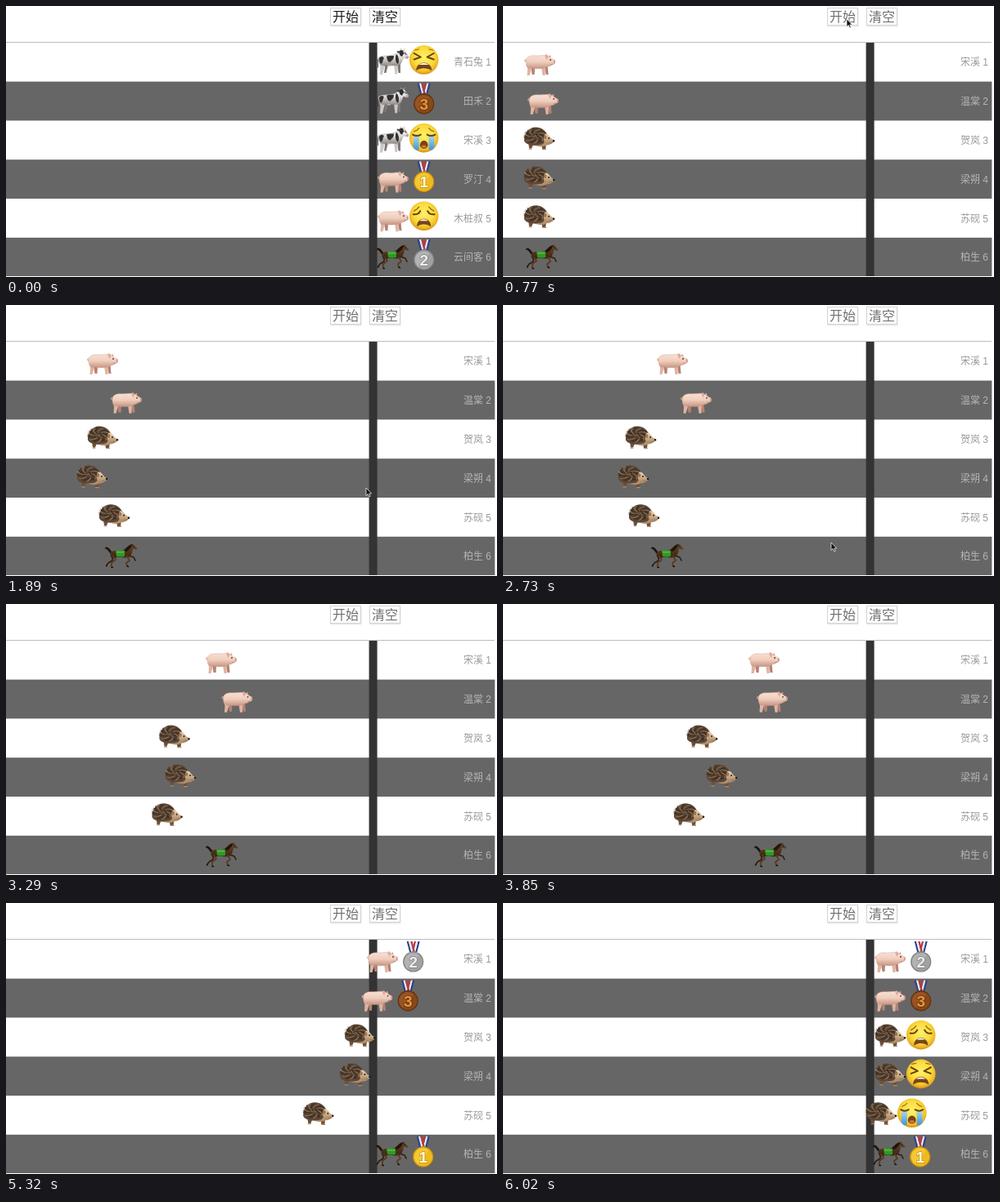
Recreate the animation shown at these times as an HTML page. Size 600 px wide and 332 px high, loop 6.09 s.

```html
<!DOCTYPE html>
<html lang="zh">
<head>
<meta charset="utf-8">
<title>动物赛跑</title>
<style>
html, body { margin: 0; width: 100%; height: 100%; overflow: hidden; background: #fff; }
svg { display: block; width: 600px; height: 332px; }
text { font-family: "Liberation Sans", "Noto Sans CJK SC", "Noto Sans CJK", sans-serif; }
.label { font-size: 12px; font-weight: 500; text-anchor: end; }
.button { font-size: 16px; font-weight: 500; text-anchor: middle; }
.digit { font-size: 19px; font-weight: 700; text-anchor: middle; paint-order: stroke; }
</style>
</head>
<body>
<svg id="stage" viewBox="0 0 600 332">
  <defs>
    <linearGradient id="pink" x2="0" y2="1"><stop stop-color="#f8e0d4"/><stop offset=".5" stop-color="#f0cdbc"/><stop offset="1" stop-color="#c59383"/></linearGradient>
    <linearGradient id="hide" x2="0" y2="1"><stop stop-color="#f7f6f5"/><stop offset=".5" stop-color="#dddbd9"/><stop offset="1" stop-color="#8e8a87"/></linearGradient>
    <linearGradient id="bay" x2="0" y2="1"><stop stop-color="#6d4a2d"/><stop offset="1" stop-color="#38220f"/></linearGradient>
    <linearGradient id="fur" x2="0" y2="1"><stop stop-color="#ecd6b6"/><stop offset="1" stop-color="#a98562"/></linearGradient>
    <radialGradient id="skin" cy=".42" r=".58"><stop stop-color="#fff06a"/><stop offset=".6" stop-color="#fbdb3c"/><stop offset=".85" stop-color="#efb925"/><stop offset="1" stop-color="#cf8f18"/></radialGradient>
    <linearGradient id="tear" x2="0" y2="1"><stop stop-color="#9fd6f2"/><stop offset="1" stop-color="#4295d2"/></linearGradient>
  </defs>
</svg>
<script>
const LOOP = 6090, STEP = 70, SWAP = 420, PITCH = 47.8, TOP = 45, SHOW_AT = 446;
const stage = document.getElementById('stage');

const path = (d, fill, extra = '') => `<path d="${d}" fill="${fill}" ${extra}/>`;
const line = (d, color, width) =>
  path(d, 'none', `stroke="${color}" stroke-width="${width}" stroke-linecap="round" stroke-linejoin="round"`);
const oval = (x, y, rx, ry, fill, extra = '') =>
  `<ellipse cx="${x}" cy="${y}" rx="${rx}" ry="${ry}" fill="${fill}" ${extra}/>`;
const rect = (x, y, w, h, fill, extra = '') =>
  `<rect x="${x}" y="${y}" width="${w}" height="${h}" fill="${fill}" ${extra}/>`;

function spines() {
  let dark = '', light = '';
  for (let i = 0; i < 120; i++) {
    const a = i * 2.4, r = Math.sqrt(i / 120);
    const x = -4 + 13 * r * Math.cos(a), y = -3.5 + 8.5 * r * Math.sin(a);
    const stroke = `M${x.toFixed(1)} ${y.toFixed(1)}l-1.9 ${(y > 0 ? .9 : -.9)}`;
    if (i % 3) dark += stroke; else light += stroke;
  }
  return path('M-18 3C-19 -6 -13 -14 -4 -14C3 -14 8 -10 10 -5C8 0 8 5 4 7C-3 9 -15 9 -18 3Z', '#5d4735') +
    line(dark, '#37291d', .8) + line(light, '#a58a6b', .6);
}

const animals = {
  pig: { y: 27, art:
    line('M-16 -4C-19 -3 -19 -7 -17 -6', '#dca994', 1.1) +
    path('M-11 2L-9.500 12H-6.500L-6 3ZM6 3L7.500 12H10.500L9.500 1Z', '#b58272') +
    path('M-16.500 0L-15 5L-15.500 13H-12.500L-9.500 3ZM2 3L3.500 13H6.500L7 2Z', '#e0b3a1') +
    path('M-17 -4C-17 -11 -10 -11.500 -4 -11C2 -11 5 -12 9 -11C13 -10 14 -7 18 -6C19 -4 18.500 -1.500 17.500 -1C14 0 13 2 10 2C6 5 -5 5.500 -10 4C-14 5 -17 3 -17 -4Z', 'url(#pink)', 'stroke="#c49887" stroke-width=".4"') +
    path('M6.500 -10C6 -14 9 -13 10.500 -10L8.500 -6Z', '#dfab9b') +
    path('M11 -10C12 -13.500 14 -11.500 13 -8.500Z', '#dba697') +
    oval(13, -6, .8, .9, '#30201c') + oval(17.7, -3.5, .9, 2.3, '#d39788') +
    line('M13 0L16 -.8', '#a87264', .6) },
  hedgehog: { y: 22, art:
    path('M-13 5L-12 12H-9L-7 7ZM3 6L4 13H8L9 5Z', '#6e513a') +
    path('M-11 6C-3 10 5 11 9 8C13 8 16 6 18 4C19 2 18 1 17 1C14 0 13 -5 9 -6L-4 4Z', 'url(#fur)') +
    spines() +
    path('M8 -6C12 -5 13 -2 14.500 -.5C16 1 18 1 18.500 3C17 6 12 7 9 7C5 6 5 -4 8 -6Z', 'url(#fur)') +
    oval(7.5, -2, 1.8, 2.5, '#a07552') + oval(12, -.5, .9, 1, '#16100c') +
    oval(18, 2.6, 1.2, 1.2, '#1b1513') + line('M12.500 5Q15 5.500 16.500 4.500', '#79563b', .5) +
    line('M-9 12.500H-12M4.500 13.200H8.500', '#b28c6a', 1.1) },
  horse: { y: 23, art:
    line('M-11 0L-11 6L-16 9L-18 12M9 0L15 2L17 6', '#2f1d0f', 1.6) +
    path('M-12 -5C-16 -11 -20 -12 -20 -8C-19 -10 -16 -6 -13 -2Z', '#1e140d') +
    path('M-13 -3C-12 -7 -6 -6 0 -6C6 -7 9 -11 12 -13L15 -15L15.500 -13L19.500 -8.500C19 -7 17.500 -7 14.500 -9C13 -5 13 0 9 2C4 3 -2 2 -6 2C-9 5 -15 3 -13 -3Z', 'url(#bay)') +
    path('M2 -6C6 -9 9 -14 14 -14L11 -9L7 -5Z', '#21150d') +
    line('M-10 1L-7 5L-12 9L-12 14M7 1L10 6L6 9L7 13', '#5a3a20', 1.8) +
    line('M-12 14.500H-10.500M7 13L8.500 13.500M-18 12L-18.500 13', '#15100b', 1.4) +
    path('M-7 -6.500Q-1 -5 4 -6.500L4 1Q-1 2 -6 1Z', '#2c9a25') +
    path('M-6 -5.500L3 -5.500L3 -3L-6 -3Z', '#5fc644', 'opacity=".6"') +
    line('M14.500 -12L15.500 -9', '#20251b', .6) + oval(15, -11.5, .5, .5, '#0d0a08') },
  cow: { y: 23, art:
    line('M-17 -5C-20 -2 -18 3 -18.500 7', '#45413f', 1) +
    path('M-11 2L-10 7L-11 14H-8.500L-6 4ZM5 3L6.500 14H9L9 1Z', '#7d7976') +
    path('M-17 1L-15.500 7L-16 16H-13L-10 4ZM1 4L2.500 15.500H5L6 3Z', '#cbc7c4') +
    path('M-18 -4C-16 -8 -8 -6 0 -8C5 -9 7 -14 12 -14C16 -13 16 -9 19 -6C19 -3 16 -3 13 -5C11 -3 11 2 8 4C2 6 -6 4 -11 5C-17 5 -18 0 -18 -4Z', 'url(#hide)', 'stroke="#8a8582" stroke-width=".4"') +
    path('M-17 -4C-14 -7 -12 -6 -11 -4C-13 -2 -12 2 -15 3C-17 1 -17 -2 -17 -4ZM-8 -6C-5 -7.500 -1 -7 1 -7C1 -4 0 -2 -2 -1C-3 2 -6 1 -7 -2ZM4 -9C7 -7 8 0 6 3C3 2 2 -5 4 -9Z', '#343130') +
    path('M8 -13C10 -15 13 -14 13 -10L11 -6C8 -7 7 -10 8 -13ZM14 -12L17 -8L15 -8.500Z', '#302d2c') +
    path('M8.500 -12.500L4.500 -13Q5 -9.500 9 -10Z', '#4a4643') + line('M10 -14L9.500 -15.500M13 -14L14 -15.500', '#b9af9b', .9) +
    oval(17.2, -5.2, 1.7, 1.5, '#c39d95') + oval(13.2, -10, .6, .7, '#111') + oval(-5, 5, 2.3, 1, '#cfa69d') }
};

const head = oval(0, 0, 17.8, 17.8, 'url(#skin)');
const BROWN = '#63400f';
const openMouth = d => path(d, '#7b431a', 'stroke="#5c350f" stroke-width=".7"');
const teeth = d => path(d, '#fff8e8');
function medal(n, rim, base, shine, ink) {
  const strap = s => [['#28458c', 8], ['#eceaf0', 5.7], ['#b63a42', 3.4]]
    .map(([c, x]) => path(`M${x * s} -25h${-2.3 * s}l${-3.3 * s} 13h${2.3 * s}Z`, c)).join('');
  return { y: 27, art: strap(1) + strap(-1) + oval(0, -12, 2, 1.3, rim) +
    oval(0, 0, 12.6, 12.6, rim) + oval(0, 0, 11.4, 11.4, base) +
    path('M-9 -6A11 11 0 0 1 7 -8L-6 9A11 11 0 0 1 -9 -6Z', shine, 'opacity=".35"') +
    `<text class="digit" y="6.8" fill="${ink}" stroke="${rim}" stroke-width="1.4">${n}</text>` };
}
const results = {
  gold: medal(1, '#c98f0d', '#efba1d', '#ffe36a', '#fffbe0'),
  silver: medal(2, '#808080', '#a2a2a2', '#d4d4d4', '#ededed'),
  bronze: medal(3, '#61300f', '#864819', '#b86d34', '#e8983f'),
  tired: { y: 21, art: head +
    line('M-12 -8L-4 -3.500L-12 -.5M12 -8L4 -3.500L12 -.5', BROWN, 2) +
    line('M-11 -12L-6 -13M11 -12L6 -13', '#a8690f', 1.1) +
    openMouth('M-9 12.500C-9 1 9 1 9 12.500C5 9 -5 9 -9 12.500Z') + teeth('M-6 6C-3 3.300 3 3.300 6 6Z') },
  weary: { y: 21, art: head +
    line('M-13 -2Q-7 -1 -4.500 -6M13 -2Q7 -1 4.500 -6', BROWN, 2) +
    line('M-12 -6Q-8 -8 -6 -11M12 -6Q8 -8 6 -11', '#99640f', 1.3) +
    openMouth('M-8 12.500C-8 1 8 1 8 12.500C4 9 -4 9 -8 12.500Z') + teeth('M-5 6C-3 3.300 3 3.300 5 6Z') },
  crying: { y: 21, art: head +
    path('M-12.500 -2H-6V14Q-9 17 -13 12ZM12.500 -2H6V14Q9 17 13 12Z', 'url(#tear)') +
    line('M-13.500 -4Q-9 -1 -4 -4M13.500 -4Q9 -1 4 -4', BROWN, 2) +
    line('M-12 -8Q-8 -9 -6 -12M12 -8Q8 -9 6 -12', '#99640f', 1.1) +
    openMouth('M-4.500 9C-4.500 2 4.500 2 4.500 9C4.500 14 -4.500 14 -4.500 9Z') + oval(0, 10.5, 3, 1.7, '#d8743f') }
};

const past = [
  ['cow', '青石兔', 'tired'], ['cow', '田禾', 'bronze'], ['cow', '宋溪', 'crying'],
  ['pig', '罗汀', 'gold'], ['pig', '木桩叔', 'weary'], ['horse', '云间客', 'silver']
].map(r => [...r, [[0, 473]]]);

// Each runner: animal, name, result, then [time, centre x] points.
const race = [
  ['pig', '宋溪', 'silver', [[630, 36], [770, 45], [1890, 118], [2730, 207], [3850, 319], [4550, 381], [5180, 447], [5460, 473]]],
  ['pig', '温棠', 'bronze', [[630, 36], [770, 49], [1890, 147], [2730, 236], [3850, 329], [4550, 379], [5250, 447], [5530, 473]]],
  ['hedgehog', '贺岚', 'weary', [[630, 35], [770, 44], [1890, 118], [2730, 168], [3850, 243], [4550, 351], [5460, 447], [5670, 473]]],
  ['hedgehog', '梁朔', 'tired', [[630, 35], [770, 44], [1260, 67], [1890, 105], [2520, 143], [2730, 159], [3850, 267], [4550, 351], [5530, 447], [5740, 473]]],
  ['hedgehog', '苏砚', 'crying', [[630, 35], [770, 44], [1890, 132], [2730, 172], [3150, 189], [3850, 227], [4410, 281], [4550, 295], [5040, 348], [5670, 423], [6020, 462]]],
  ['horse', '柏生', 'gold', [[630, 36], [770, 48], [1890, 141], [2730, 201], [3850, 327], [4550, 397], [5040, 448], [5320, 472]]]
];
const pointer = [[280, 427, -12], [420, 420, 16], [1330, 420, 16], [1820, 440, 224], [1960, 440, 224], [2660, 401, 291], [2800, 401, 291], [3080, 385, 334]];

function at(keys, t, k = 1) {
  if (t <= keys[0][0]) return keys[0][k];
  for (let i = 1; i < keys.length; i++) {
    const a = keys[i - 1], b = keys[i];
    if (t <= b[0]) return a[k] + (b[k] - a[k]) * (t - a[0]) / (b[0] - a[0]);
  }
  return keys[keys.length - 1][k];
}

function add(markup, parent = stage) {
  const g = document.createElementNS('http://www.w3.org/2000/svg', 'g');
  g.innerHTML = markup;
  return parent.appendChild(g);
}
const move = (g, x, y) => g.setAttribute('transform', `translate(${x.toFixed(2)} ${y.toFixed(2)})`);
const show = (g, on) => g.setAttribute('visibility', on ? 'inherit' : 'hidden');

const button = (x, label) =>
  rect(x + .5, 3.5, 38, 22, '#e9e9e9') + rect(x + .5, 2.5, 37, 21, '#fff', 'stroke="#d2d2d2"') +
  `<text class="button" x="${x + 19}" y="19">${label}</text>`;

const buttons = add(button(396, '开始') + button(444, '清空'));
add(rect(0, 44, 597, 1, '#bdbdbd') +
  [1, 3, 5].map(i => rect(0, TOP + i * PITCH - .2, 597.4, PITCH, '#666')).join('') +
  rect(0, 331, 600, 1, '#fff') + rect(443.6, 45, 10, 286, '#333'));

function buildField(rows) {
  const field = add('');
  const runners = rows.map(([kind, name, result, keys], i) => {
    const y = TOP + i * PITCH, animal = animals[kind], prize = results[result];
    add(`<text class="label" x="593" y="${y + 28.3}" fill="${i % 2 ? '#b5b5b5' : '#999'}">${name} ${i + 1}</text>`, field);
    return { keys, y, animal, prize, body: add(animal.art, field), award: add(prize.art, field) };
  });
  return { field, runners };
}

const fields = [buildField(past), buildField(race)];
const arrow = add(path('M0 0V9.500L2.200 7.500L3.800 11L5.300 10.300L3.800 7H6.700Z', '#111', 'stroke="#fff" stroke-width=".7"'));

function draw(t) {
  fields.forEach(({ field, runners }, n) => {
    const active = n === (t < SWAP ? 0 : 1);
    show(field, active);
    if (!active) return;
    for (const r of runners) {
      const x = at(r.keys, t);
      move(r.body, x, r.y + r.animal.y);
      move(r.award, x + 37.7, r.y + r.prize.y);
      show(r.award, x >= SHOW_AT);
    }
  });
  buttons.setAttribute('fill', t < STEP ? '#1c1c1c' : '#707070');
  move(arrow, at(pointer, t, 1), at(pointer, t, 2));
}

const start = performance.now();
function tick() {
  const t = (performance.now() - start) % LOOP;
  draw(Math.floor(t / STEP) * STEP);
  requestAnimationFrame(tick);
}
draw(0);
tick();
</script>
</body>
</html>
```
